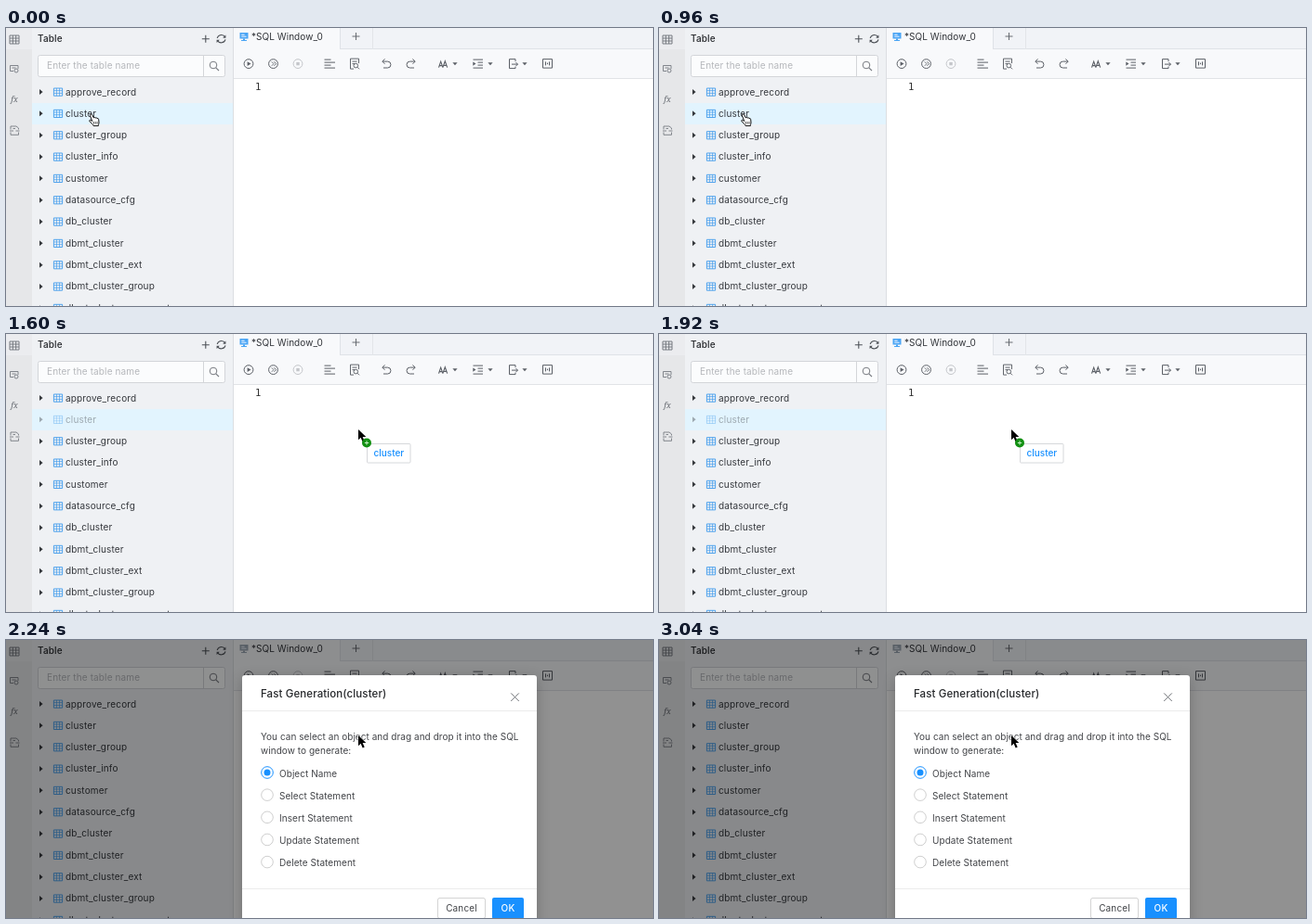
Animation, 696 px wide and 300 px high, one loop 3200 ms. Source, as an HTML page with a canvas:

```html
<!DOCTYPE html>
<html lang="en">
<head>
<meta charset="utf-8">
<title>Drag a table into the SQL window</title>
<style>
html, body { margin: 0; width: 100%; height: 100%; overflow: hidden; background: #fff; }
canvas { display: block; width: 696px; height: 300px; }
</style>
</head>
<body>
<canvas id="stage"></canvas>
<script>
const W = 696, H = 300, LOOP = 3200;
const BLUE = '#1890ff', INK = '#3c3e42', ICON = '#5b5f66';
const canvas = document.getElementById('stage');
const ctx = canvas.getContext('2d');
const dpr = window.devicePixelRatio || 1;
canvas.width = W * dpr;
canvas.height = H * dpr;

const tables = ['approve_record', 'cluster', 'cluster_group', 'cluster_info', 'customer',
  'datasource_cfg', 'db_cluster', 'dbmt_cluster', 'dbmt_cluster_ext',
  'dbmt_cluster_group', 'dbmt_cluster_comment'];
const choices = ['Object Name', 'Select Statement', 'Insert Statement',
  'Update Statement', 'Delete Statement'];

function rect(x, y, w, h, color) {
  ctx.fillStyle = color;
  ctx.fillRect(x, y, w, h);
}

function text(str, x, y, { size = 10, weight = 400, color = INK, font = 'Inter, "Open Sans", sans-serif',
  align = 'left', space = 0.15 } = {}) {
  ctx.font = `${weight} ${size}px ${font}`;
  ctx.letterSpacing = space + 'px';
  ctx.textAlign = align;
  ctx.fillStyle = color;
  ctx.fillText(str, x, y);
}

function stroke(d, color = ICON, width = 1) {
  ctx.strokeStyle = color;
  ctx.lineWidth = width;
  ctx.stroke(new Path2D(d));
}

function fill(d, color = ICON) {
  ctx.fillStyle = color;
  ctx.fill(new Path2D(d));
}

function circle(x, y, r, fillColor, lineColor, width = 1) {
  ctx.beginPath();
  ctx.arc(x, y, r, 0, Math.PI * 2);
  if (fillColor) { ctx.fillStyle = fillColor; ctx.fill(); }
  if (lineColor) { ctx.strokeStyle = lineColor; ctx.lineWidth = width; ctx.stroke(); }
}

function box(x, y, w, h, r, fillColor, lineColor) {
  ctx.beginPath();
  ctx.roundRect(x, y, w, h, r);
  if (fillColor) { ctx.fillStyle = fillColor; ctx.fill(); }
  if (lineColor) { ctx.strokeStyle = lineColor; ctx.lineWidth = 1; ctx.stroke(); }
}

function at(x, y, draw) {
  ctx.save();
  ctx.translate(x, y);
  draw();
  ctx.restore();
}

const caret = x => fill(`M${x - 2.6} 37.6h5.2l-2.6 3z`);

function rail() {
  const line = '#777b82';
  rect(0, 0, 28, H, '#e6e7e9');
  rect(0, 0, 28, 23, '#ebecef');
  stroke('M4 8h10v9h-10zM4 11h10M4 14h10M7.3 8v9M10.7 8v9', '#6c7077', 0.9);
  stroke('M13 44v-3.500h-8.500v6h3.500M6.500 43h4', line, 0.9);
  circle(11, 46, 2, null, line, 0.9);
  text('fx', 5.2, 80.4, { size: 8.8, weight: 'italic 400', color: '#666a70', font: '"Noto Serif", serif', space: 0 });
  stroke('M5 109.500v-3.500h6l2.500 2v1.500M5 112.500v2.800h8.500v-2.800M4 111h4M10.500 111h4M7.500 108.500h2.500', line, 0.9);
}

function tableIcon(y, color) {
  stroke(`M51.4 ${y - 4}h9.2v8.200h-9.2z`, color, 0.9);
  stroke(`M51.4 ${y - 1.4}h9.2M51.4 ${y + 1.4}h9.2M54.4 ${y - 4}v8.200M57.600 ${y - 4}v8.200`, color, 0.7);
}

function sidebar(hover, dragged, iconColor) {
  rect(28, 0, 216, H, '#eff1f4');
  text('Table', 34, 15.3, { weight: 500, color: '#25272b' });
  stroke('M210.800 11.700h8M214.800 7.700v8', '#4d5157', 1.1);
  stroke('M227.200 11a4.600 4.600 0 0 1 8.600 -1M236 12.300a4.600 4.600 0 0 1 -8.600 1', '#4d5157', 1.1);
  fill('M236.400 7.500v3.300h-3.200zM226.600 16v-3.300h3.200z', '#4d5157');
  box(34.5, 29.5, 201, 23, 2, '#fbfcfd', '#d3d5d9');
  stroke('M212.5 29.5v23', '#d3d5d9');
  text('Enter the table name', 44, 44.4, { color: '#b5b7bb', space: 0.13 });
  circle(223, 40, 3.8, null, '#777a80', 1);
  stroke('M225.800 42.800l3.200 3.200', '#777a80', 1.1);

  if (hover) rect(28, 81, 216, 23, hover);
  tables.forEach((name, i) => {
    const y = 69 + i * 23.33;
    ctx.globalAlpha = i === 1 && dragged ? 0.4 : 1;
    fill(`M36 ${y - 3}l3.600 3l-3.600 3z`, '#34373b');
    tableIcon(y, iconColor);
    text(name, 64, y + 3.5, { color: '#34373c' });
    ctx.globalAlpha = 1;
  });
  rect(244, 0, 1, H, '#dcdee2');
}

function toolbar() {
  const y = 39, soft = '#c4c6ca';
  circle(261, y, 4.9, null, ICON);
  fill('M259.600 36.600l3.900 2.400l-3.900 2.400z');
  circle(287.5, y, 4.9, null, ICON);
  stroke('M285.800 36.800l2.200 2.200l-2.200 2.200M288.400 36.800l2.200 2.200l-2.200 2.200', ICON, 0.9);
  circle(314, y, 4.9, null, soft);
  rect(312.3, 37.3, 3.4, 3.4, soft);
  stroke('M342.500 34.500h7M342.500 37.500h11.500M342.500 40.500h7M342.500 43.500h11.500');
  stroke('M374 44.500h-3.500v-11h9v5M372.500 36.500h5M372.500 39h2.500', ICON, 0.95);
  circle(376.3, 41, 2.3, null, ICON, 0.95);
  stroke('M378 42.700l2 2');
  stroke('M405 36.500h5.500a3.400 3.400 0 0 1 0 6.900h-4.500M407.500 33.800l-2.700 2.700l2.700 2.700');
  stroke('M440 36.500h-5.500a3.400 3.400 0 0 0 0 6.900h4.500M437.500 33.800l2.700 2.700l-2.700 2.700');
  stroke('M465.500 43l2.200 -6.500l2.200 6.500M466.300 41h2.800M469.900 43l2.400 -7l2.400 7M470.800 40.800h3', ICON, 1.1);
  stroke('M502.500 34.500h10.500M507.500 37.500h5.500M507.500 40.500h5.500M502.500 43.500h10.500');
  fill('M502.300 36.800l3.200 2.200l-3.200 2.200z');
  stroke('M548 36.500v-2.500h-6.500v10h6.500v-2M544 39.500h6.500M548.500 37.500l2 2l-2 2');
  [483, 521, 558].forEach(caret);
  stroke('M577.500 34h10v9.500h-10zM580.500 36.800v4M584.500 36.800v4M582.500 38v1.600');
}

function editor(tabColor) {
  rect(245, 0, W - 245, H, '#fff');
  rect(245, 0, W - 245, 23, '#f1f3f7');
  rect(245, 0, 114, 23, '#f8f9fb');
  rect(359, 22, W - 359, 1, '#dfe2e7');
  rect(359, 0, 1, 23, '#dfe2e7');
  rect(394, 0, 1, 23, '#e3e5e9');
  rect(251.5, 5, 9, 6.5, tabColor);
  rect(253.2, 6.700, 3.4, 1, '#eef6ff');
  rect(253.2, 8.700, 5.4, 1, '#eef6ff');
  rect(255, 11.5, 2, 1.5, tabColor);
  rect(253, 13, 6, 1, tabColor);
  text('*SQL Window_0', 264, 12.700, { color: '#303338', space: 0.05 });
  stroke('M372.500 9h8M376.500 5v8', '#666a70');
  rect(245, 23, W - 245, 31, '#f8f9fb');
  rect(245, 54, W - 245, 1, '#e1e3e7');
  at(0, -0.4, toolbar);
  text('1', 268, 67.3, { size: 10.5, color: '#333', font: '"DejaVu Sans Mono", monospace', space: 0 });
}

function dialog(panel) {
  ctx.save();
  ctx.shadowColor = 'rgba(0,0,0,.22)';
  ctx.shadowBlur = 14 * dpr;
  ctx.shadowOffsetY = 3 * dpr;
  box(254, 38, 317, 271.5, 3, panel);
  ctx.restore();
  text('Fast Generation(cluster)', 274, 61.500, { size: 11.5, weight: 500, color: '#26282b', space: 0.1 });
  stroke('M543.200 57.400l8.600 8.600M551.800 57.400l-8.600 8.600', '#707378', 1);
  rect(254, 76, 317, 1, 'rgba(0,0,0,.08)');
  const body = { color: '#424448', space: 0.045 };
  text('You can select an object and drag and drop it into the SQL', 274, 108.2, body);
  text('window to generate:', 274, 123.200, body);
  choices.forEach((label, i) => {
    const y = 143 + i * 24.15;
    circle(281, y, 6.3, null, i ? 'rgba(0,0,0,.19)' : BLUE);
    if (!i) circle(281, y, 3.5, BLUE);
    text(label, 294, y + 4.6, { color: '#424448', space: 0.06 });
  });
  rect(254, 268, 317, 1, 'rgba(0,0,0,.08)');
  box(464.5, 278.5, 51, 22, 2, null, 'rgba(0,0,0,.17)');
  text('Cancel', 490, 293.2, { color: '#424448', align: 'center' });
  box(523, 278, 34, 23, 2, BLUE);
  text('OK', 540, 293.2, { weight: 500, color: '#fff', align: 'center' });
}

function ghost(x, y) {
  box(x + 0.5, y + 0.5, 46.5, 20.5, 1, '#fff', '#d6d8db');
  text('cluster', x + 7.5, y + 14.1, { weight: 500, color: BLUE, space: 0 });
}

function badge(x, y) {
  circle(x, y, 5, '#129012');
  stroke(`M${x - 2.2} ${y}h4.4M${x} ${y - 2.2}v4.4`, '#c9f0c9', 1);
}

function arrow(x, y) {
  at(x, y, () => {
    const d = 'M0 0v11.200l2.600 -2.400l2.100 4.700l2 -.9l-2.100 -4.500h3.700z';
    ctx.lineJoin = 'round';
    stroke(d, 'rgba(255,255,255,.8)', 1.4);
    fill(d, '#000');
  });
}

function hand(x, y) {
  at(x, y, () => {
    const d = 'M1.200 1.300q1.200 -1 2 .3l1.400 3.200q1.200 -.8 2 .2q1.200 -.6 1.900 .5q1.500 -.3 1.700 1.200' +
      'l.3 3.300q0 1.300 -.6 2.300v1.300h-5.300l-.5 -1.300l-3.600 -3.500q-.8 -1.200 .2 -1.500q.8 -.2 2.500 1.200l-2.100 -5.700q-.3 -1 .1 -1.500z';
    ctx.lineJoin = 'round';
    fill(d, '#fff');
    stroke(d, '#111', 1);
    stroke('M5 9v2.700M6.800 9v2.700M8.600 9v2.700', '#222', 0.7);
  });
}

function draw(t) {
  const dragging = t >= 1280 && t < 2080;
  const modal = t >= 2080;
  const opening = modal && t < 2240;
  ctx.setTransform(dpr, 0, 0, dpr, 0, 0);
  ctx.textBaseline = 'alphabetic';

  editor(modal ? '#9ba6b2' : '#4aa5f5');
  rail();
  sidebar(!modal ? '#e2f4fe' : opening ? '#eaecee' : null, dragging, opening ? '#6f9cc8' : '#3f9bec');

  if (t < 1280) {
    hand(t < 160 ? 89.5 : 88.5, 92);
  } else if (t < 1440) {
    ghost(101, 107);
    badge(101, 106.5);
    arrow(156, 93);
  } else if (dragging) {
    const x = t < 1600 ? 369 : 379;
    ghost(x + 9, 118);
    arrow(x, 103);
    badge(x + 9, 117.5);
  } else {
    rect(0, 0, W, H, `rgba(0,0,0,${opening ? 0.27 : 0.43})`);
    ctx.save();
    if (opening) {
      ctx.globalAlpha = 0.85;
      ctx.translate(412.5, 182);
      ctx.scale(0.792, 0.792);
      ctx.translate(-412.5, -182);
    }
    dialog(opening ? '#ebedf0' : '#fff');
    ctx.restore();
    arrow(379, 103);
  }
}

function tick() {
  draw(performance.now() % LOOP);
  requestAnimationFrame(tick);
}
tick();
</script>
</body>
</html>
```
